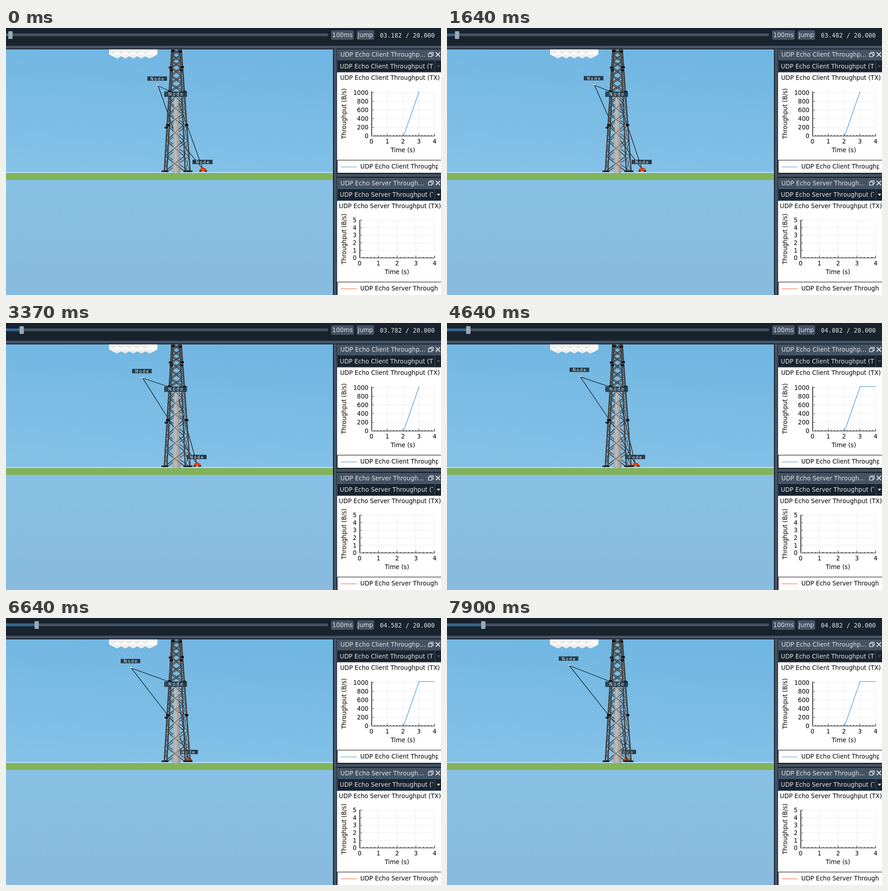
Write an HTML page that moves like this. It is 954x587 px and loops after 8 s.

```html
<!DOCTYPE html>
<html lang="en">
<head>
<meta charset="utf-8">
<title>Network simulation playback</title>
<style>
  html, body { margin: 0; width: 100%; height: 100%; overflow: hidden; background: #19232d; }
  svg { display: block; width: 954px; height: 587px; }
  text { font: 13.2px "DejaVu Sans", sans-serif; white-space: pre; }
  .mono { font: 13.33px "DejaVu Sans Mono", monospace; }
  .mid { text-anchor: middle; }
  .end { text-anchor: end; }
  .ui { fill: #e0e1e3; }
  .tag { letter-spacing: 2px; font-size: 9px; fill: #f4f6f7; }
</style>
</head>
<body>
<svg id="stage" viewBox="0 0 954 587" xmlns="http://www.w3.org/2000/svg">
  <defs>
    <linearGradient id="sky" x1="0.6" y1="0" x2="0.4" y2="1">
      <stop offset="0" stop-color="#70b6e2"/><stop offset="1" stop-color="#84c1e7"/>
    </linearGradient>
    <linearGradient id="below" x1="0" y1="0" x2="0" y2="1">
      <stop offset="0" stop-color="#87c0e4"/><stop offset="1" stop-color="#88bbde"/>
    </linearGradient>
    <linearGradient id="steel">
      <stop offset="0" stop-color="#aaa6a4"/><stop offset="0.4" stop-color="#bfbbb9"/>
      <stop offset="1" stop-color="#918d8c"/>
    </linearGradient>
    <clipPath id="view"><rect x="0" y="46" width="717" height="541"/></clipPath>
    <clipPath id="combo"><rect x="726" y="70" width="211" height="310"/></clipPath>
    <clipPath id="legend"><rect x="726" y="290" width="222" height="297"/></clipPath>
  </defs>
</svg>
<script>
const NS = 'http://www.w3.org/2000/svg';
const stage = document.getElementById('stage');

function el(parent, tag, attrs = {}, content) {
  const node = document.createElementNS(NS, tag);
  for (const key in attrs) node.setAttribute(key, attrs[key]);
  if (content !== undefined) node.textContent = content;
  parent.appendChild(node);
  return node;
}
const set = (node, attrs) => { for (const key in attrs) node.setAttribute(key, attrs[key]); };
const rect = (p, x, y, width, height, fill, more) => el(p, 'rect', { x, y, width, height, fill, ...more });
const path = (p, d, stroke, width = 1, more) =>
  el(p, 'path', { d, stroke, 'stroke-width': width, fill: 'none', ...more });
const label = (p, x, y, str, cls = '', more) => el(p, 'text', { x, y, class: cls, ...more }, str);
const lerp = (a, b, u) => a + (b - a) * u;

const DARK = '#19232d', PANE = '#455364', HOVER = [96, 121, 139], REST = [69, 83, 100];

// ---------- 3D view ----------
const view = el(stage, 'g', { 'clip-path': 'url(#view)' });
rect(view, 0, 46, 717, 271, 'url(#sky)');
rect(view, 0, 333, 717, 254, 'url(#below)');
rect(view, 0, 316, 717, 3, '#aed5ee');
rect(view, 0, 319, 717, 15, '#81b35a');

function drawCloud() {
  const step = 106 / 6;
  let edge = 'M226 46V58', facets = '';
  for (let i = 1; i <= 5; i++) {
    const x = 226 + i * step;
    edge += `L${x} 67L${x + step / 2} ${i < 5 ? 62 : 63}`;
    facets += `M${x - step / 2} 59h${step}l${-step / 2} 8ZM${x - step} 50h${step}l${-step / 2} 8Z`;
  }
  el(view, 'path', { d: edge + 'L332 58V46Z', fill: '#fafafa' });
  el(view, 'path', { d: facets, fill: '#ececeb' });
}
drawCloud();

const links = path(view, '', '#0c0c0c', 1.2);

const car = el(view, 'g');
el(car, 'path', { d: 'M-7 315Q-9 309 -3 308Q0 305 4 308Q9 309 8 315Z', fill: '#ee4a12' });
path(car, 'M-4 309.5H5', '#a8310c');
path(car, 'M-8 314.5H-3M3 314.5H9', '#1c1c1c', 2.4);

function tag(parent, width, height) {
  const g = el(parent, 'g');
  rect(g, -width / 2, -height / 2, width, height, '#1d3442', { opacity: 0.94 });
  label(g, 1, 3.3, 'Node', 'tag mid', { transform: `scale(${Math.min(height / 9.5, 1.1)})` });
  return g;
}
const carTag = tag(view, 44, 9.5);

// Tower legs as [x at y=46, x at y=316]
const LEGS = { lo: [363.5, 347], li: [367, 353], ri: [381, 393], ro: [384.5, 404] };
// top, bottom, rows of bracing
const SECTIONS = [[46, 87, 3], [87, 140, 3], [140, 214, 3], [214, 316, 3]];
const legX = (leg, y) => lerp(...LEGS[leg], (y - 46) / 270);
const at = (leg, y) => `${legX(leg, y).toFixed(1)} ${y.toFixed(1)}`;

function crosses(a, b) {
  let d = '';
  for (const [top, bottom, rows] of SECTIONS) {
    const h = (bottom - top) / rows;
    for (let y = top; y < bottom - 1; y += h) {
      d += `M${at(a, y)}L${at(b, y + h)}M${at(b, y)}L${at(a, y + h)}`;
    }
  }
  return d;
}

function drawTower() {
  path(view, crosses('li', 'ro'), '#505152', 1.8);
  path(view, crosses('lo', 'ri'), '#454545', 1.8);
  el(view, 'path', { d: 'M369 150H378.5L382.5 318Q374 321 365 318Z', fill: 'url(#steel)' });
  path(view, crosses('lo', 'ri'), '#454545', 1.6, { opacity: 0.55 });
  path(view, crosses('lo', 'li') + crosses('ri', 'ro'), '#4b4b4b', 1.2);
  for (const leg in LEGS) path(view, `M${at(leg, 46)}L${at(leg, 316)}`, '#404041', 2.6);
  // joints and feet
  path(view, 'M362 51H370M378 52H386M357 87H364M359 93H366M383 86H390M381 93H388' +
    'M355 139H362M388 140H395M351 213.5H359M348 219H355M392 213.5H400', '#0b0b0b', 4);
  path(view, 'M341 315H356M389 315H409', '#111', 3);
}
drawTower();
set(tag(view, 50, 12), { transform: 'translate(372 145.5)', opacity: 0.9 });

const drone = el(view, 'g');
path(drone, 'M-3 -1H3', '#dfe6ea', 1.6);
path(drone, 'M-1 1H2', '#555', 1.2);
const droneTag = tag(view, 43, 9.5);

// ---------- toolbar ----------
rect(stage, 0, 0, 954, 39, DARK);
rect(stage, 0, 12, 706.5, 6, PANE, { rx: 2 });
const played = rect(stage, 0, 12, 0, 6, '#346792');
const handle = rect(stage, 0, 7, 9.5, 17, '#9da9b5', { rx: 1.5 });
for (const [x, w, str] of [[713, 50, '100ms'], [769, 38.5, 'Jump']]) {
  rect(stage, x, 5, w, 21, PANE, { rx: 4 });
  label(stage, x + w / 2, 20, str, 'mid ui');
}
const clock = label(stage, 820, 21, '', 'mono ui');

rect(stage, 0, 38, 954, 9, DARK);
const splitter = rect(stage, 0, 39, 954, 6, PANE);

// ---------- docks ----------
rect(stage, 717, 46, 237, 541, DARK);
rect(stage, 719, 46, 6, 541, PANE);
rect(stage, 726, 321, 228, 6, PANE);

function plot(o) {
  const g = el(stage, 'g');
  const stepX = (940 - o.left) / 4, stepY = (o.base - o.top) / 5;
  let grid = '', ticks = '';
  for (let i = 0; i <= 20; i++) ticks += `M${o.left + i * stepX / 5} ${o.base}v${i % 5 ? -2.5 : -5}`;
  for (let i = 0; i <= 25; i++) ticks += `M${o.left} ${o.base - i * stepY / 5}h${i % 5 ? 2.5 : 5}`;
  for (let i = 0; i <= 5; i++) {
    const y = o.base - i * stepY;
    if (i) grid += `M${o.left} ${y}H940`;
    label(g, o.left - 6.5, y + 4.7, i * o.unit, 'end');
  }
  for (let i = 0; i <= 4; i++) {
    const x = o.left + i * stepX;
    if (i) grid += `M${x} ${o.base}V${o.roof}`;
    label(g, x, o.base + 16, i, 'mid');
  }
  path(g, grid, '#c4c4c4', 1, { 'stroke-dasharray': '1 2' });
  path(g, `M${o.left} ${o.roof}V${o.base}H940` + ticks, '#000');
  label(g, (o.left + 940) / 2 - 0.5, o.base + 35.5, 'Time (s)', 'mid');
  label(g, 0, 0, 'Throughput (B/s)', 'mid', { transform: `translate(746 ${(o.roof + o.base) / 2}) rotate(-90)` });
}

function dock(o) {
  const name = `UDP Echo ${o.kind} Throughput (TX)`, y = o.y;
  rect(stage, 726, y, 228, 23.5, PANE);
  label(stage, 733.5, y + 16, o.short, 'ui');
  path(stage, `M929.5 ${y + 9}V${y + 6.5}H937V${y + 13.5}H934.5M926.5 ${y + 9}H934V${y + 16}H926.5Z`, '#e0e1e3', 1.5);
  path(stage, `M942.5 ${y + 6.5}l9.5 9.5m0 -9.5l-9.5 9.5`, '#e0e1e3', 2);

  rect(stage, 726.5, y + 24, 228, 26, DARK, { stroke: o.border, rx: 2 });
  label(stage, 732, y + 41.5, name, 'ui', { 'clip-path': 'url(#combo)' });
  path(stage, `M940.5 ${y + 25}v24`, PANE);
  el(stage, 'path', { d: `M944.5 ${y + 35}h8l-4 4.5Z`, fill: o.arrow });

  rect(stage, 726, y + 50.5, 228, o.bottom - y - 50.5, '#fff');
  label(stage, 842, y + 66.5, name, 'mid');
  plot(o);
  path(stage, `M954 ${o.box}H726.5V${o.bottom}H954`, '#000');
  path(stage, `M734 ${o.box + 15}H769`, o.color);
  label(stage, 777, o.box + 18, name, '', { 'clip-path': 'url(#legend)' });
}
dock({ kind: 'Client', short: 'UDP Echo Client Throughp...', y: 47, box: 290.5, bottom: 319,
  left: 801.5, base: 237.5, top: 142, roof: 139, unit: 200, color: '#4a90c4', border: PANE, arrow: PANE });
dock({ kind: 'Server', short: 'UDP Echo Server Through...', y: 329.5, box: 558.5, bottom: 600,
  left: 775.5, base: 505.5, top: 422.5, roof: 422, unit: 1, color: '#f0592b', border: '#346792', arrow: '#e0e1e3' });
const series = path(stage, '', '#3f8dc6', 1.1);

// ---------- motion ----------
const LOOP = 8000;
const CLOCK_AT = [500, 1640, 2100, 2970, 3370, 3770, 4170, 4640, 5040, 5500, 5900, 6240, 6640, 7100, 7500, 7900];
const MOVE_AT = [1170, 1640, 2100, 2570, 2970, 3370, 3770, 4640, 5040, 5500, 5900, 6240, 6640, 7100, 7500, 7900];
// step, drone x, drone y, car x
const ROUTE = [[0, 333.5, 126.8, 432], [2, 323.5, 126, 428], [6, 300, 121.3, 419],
  [10, 284.5, 115.7, 408], [13, 275, 110.3, 400], [16, 268.5, 104.8, 393.5]];

const passed = (list, t) => list.filter(time => time <= t).length;

function pose(step) {
  const i = Math.max(1, ROUTE.findIndex(key => key[0] >= step));
  const a = ROUTE[i - 1], b = ROUTE[i], u = (step - a[0]) / (b[0] - a[0]);
  return a.map((v, j) => lerp(v, b[j], u)).slice(1);
}

function draw(t) {
  const n = passed(CLOCK_AT, t);
  const sim = 3.182 + 0.1 * (n + (n > 1));
  const left = 5 + 41.1 * (sim - 3.182);
  set(handle, { x: left });
  set(played, { width: left });
  clock.textContent = sim.toFixed(3).padStart(6, '0') + ' / 20.000';
  set(series, { d: 'M872 237.5L906 139.5' + (sim > 4 ? 'H940' : '') });

  const glow = t >= 500 && t < 1170 ? Math.min(3, Math.floor((t - 400) / 100)) / 3 : 0;
  set(splitter, { fill: `rgb(${REST.map((c, i) => Math.round(lerp(c, HOVER[i], glow)))})` });

  const [x, y, cx] = pose(passed(MOVE_AT, t));
  set(drone, { transform: `translate(${x} ${y})` });
  set(droneTag, { transform: `translate(${x - 2} ${y - 15.6})` });
  set(car, { transform: `translate(${cx} 0)` });
  set(carTag, { transform: `translate(${cx - 1} 294.5)` });
  set(links, { d: `M374 146L${x} ${y}L372 236L${cx} 311L374 150` });
}

const start = performance.now();
function tick() {
  draw((performance.now() - start) % LOOP);
  requestAnimationFrame(tick);
}
tick();
</script>
</body>
</html>
```
